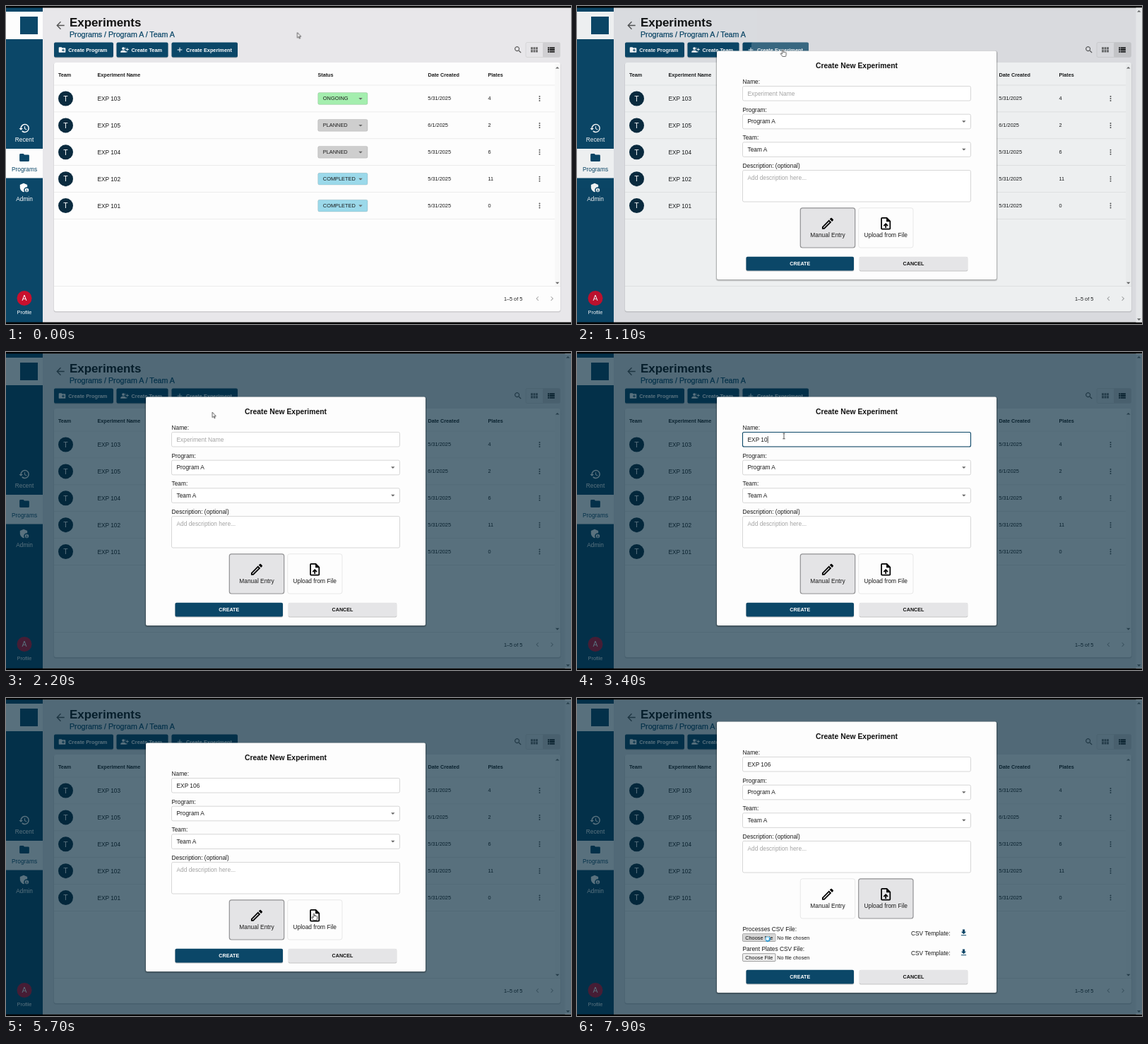
An HTML page for the animation above (8000 ms loop, 800 px wide and 450 px high).

```html
<!DOCTYPE html>
<html lang="en">
<head>
<meta charset="utf-8">
<title>Experiments</title>
<style>
html, body { margin: 0; width: 100%; height: 100%; overflow: hidden; background: #000; }
svg { display: block; width: 100vw; height: 100vh; }
text { font-family: "Liberation Sans", Arial, sans-serif; white-space: pre; }
.b { font-weight: bold; }
.m { text-anchor: middle; }
.lift { animation: lift 8s step-end infinite; }
.drop { animation: drop 8s step-end infinite; }
.dim { animation: dim 8s step-end infinite; }
.cursor { animation: travel 8s infinite; }
.spin { animation: spin 1s linear infinite; }
@keyframes lift { 0% { transform: none; } 72.5%, 100% { transform: translateY(-30px); } }
@keyframes drop { 0% { transform: none; } 72.5%, 100% { transform: translateY(30px); } }
@keyframes dim { 0% { opacity: 0; } 13.75% { opacity: .1; } 15% { opacity: .97; } 16.25%, 100% { opacity: 1; } }
@keyframes spin { to { transform: rotate(360deg); } }
@keyframes travel {
  0% { transform: translate(412.5px, 37.5px); animation-timing-function: ease-in-out; }
  11.25%, 22.5% { transform: translate(291.5px, 62px); animation-timing-function: ease-in-out; }
  33.75%, 52.5% { transform: translate(293px, 119px); animation-timing-function: ease-in-out; }
  68.75%, 80% { transform: translate(436px, 305px); animation-timing-function: cubic-bezier(.2, .5, .45, 1); }
  91.25%, 100% { transform: translate(268.5px, 336.5px); }
}
</style>
</head>
<body>
<script>
const LOOP = 8000, OPEN = 1100, FOCUS = 3000, BLUR = 5700, EXPAND = 5800;
const NAVY = '#0b4768', INK = '#1b1b1b';
const rules = [];

// Wraps content so that it shows only within the given [from, to] spans.
function during(spans, content) {
  const name = 'show' + rules.length;
  const at = (ms, state) => `${ms / LOOP * 100}% { visibility: ${state}; }`;
  const frames = [spans[0][0] > 0 ? at(0, 'hidden') : ''];
  for (const [from, to] of spans) {
    frames.push(at(from, 'visible'));
    if (to < LOOP) frames.push(at(to, 'hidden'));
  }
  frames.push(at(LOOP, spans.at(-1)[1] < LOOP ? 'hidden' : 'visible'));
  rules.push(`@keyframes ${name} { ${frames.join(' ')} } .${name} { animation: ${name} 8s step-end infinite; }`);
  return `<g class="${name}">${content}</g>`;
}

const text = (x, y, size, str, cls = '', fill = INK, extra = '') =>
  `<text x="${x}" y="${y}" font-size="${size}" class="${cls}" fill="${fill}" ${extra}>${str}</text>`;
const rect = (x, y, x2, y2, fill, extra = '') =>
  `<rect x="${x}" y="${y}" width="${x2 - x}" height="${y2 - y}" fill="${fill}" ${extra}/>`;
const path = (d, fill, extra = '') => `<path d="${d}" fill="${fill}" ${extra}/>`;
const line = (x, y, x2, color = '#e2e2e2') => rect(x, y - .3, x2, y + .3, color);
const caretDown = (x, y, fill = '#666') => path(`M${x - 2.7} ${y - 1.3}h5.4l-2.7 2.7z`, fill);
const caretUp = (x, y, fill = '#666') => path(`M${x - 2.7} ${y + 1.3}h5.4l-2.7-2.7z`, fill);

const ICONS = {
  back: 'M20 11H7.8l5.6-5.6L12 4l-8 8 8 8 1.4-1.4L7.8 13H20z',
  newFolder: 'M20 6h-8l-2-2H4a2 2 0 0 0-2 2v12a2 2 0 0 0 2 2h16a2 2 0 0 0 2-2V8a2 2 0 0 0-2-2zm-1 8h-3v3h-2v-3h-3v-2h3V9h2v3h3z',
  folder: 'M10 4H4a2 2 0 0 0-2 2v12a2 2 0 0 0 2 2h16a2 2 0 0 0 2-2V8a2 2 0 0 0-2-2h-8z',
  people: 'M8 4a4 4 0 1 0 0 8 4 4 0 1 0 0-8zM0 20v-2.500c0-2.600 5.300-4 8-4s8 1.400 8 4V20zM12.500 4.200a4 4 0 0 1 0 7.600 6 6 0 0 0 0-7.600zM17 20h2v-3l-2-2zM19 7h2v3h3v2h-3v3h-2v-3h-3v-2h3z',
  add: 'M19 13h-6v6h-2v-6H5v-2h6V5h2v6h6z',
  search: 'M15.500 14h-.8l-.3-.3A6.500 6.500 0 1 0 9.500 16c1.600 0 3.100-.6 4.200-1.600l.3.3v.8l5 5 1.500-1.500zm-6 0a4.500 4.500 0 1 1 0-9 4.500 4.500 0 0 1 0 9z',
  grid: 'M3 5h5v6H3zM9.500 5h5v6h-5zM16 5h5v6h-5zM3 12.500h5v6H3zM9.500 12.500h5v6h-5zM16 12.500h5v6h-5z',
  list: 'M3 5h4v4H3zM8 5h13v4H8zM3 10h4v4H3zM8 10h13v4H8zM3 15h4v4H3zM8 15h13v4H8z',
  history: 'M13 3a9 9 0 0 0-9 9H1l4 4 4-4H6a7 7 0 1 1 2 4.900l-1.400 1.500A9 9 0 1 0 13 3zm-1 5v5l4.300 2.500.7-1.200-3.500-2.100V8z',
  shield: 'M18 11V6.300L10.500 3 3 6.300v4.900c0 4.500 3.200 8.800 7.500 9.800l1.600-.5A6 6 0 0 1 18 11zM17 13a4 4 0 1 0 0 8 4 4 0 1 0 0-8zm0 1.400a1.100 1.100 0 1 1 0 2.200 1.100 1.100 0 1 1 0-2.200zm0 5.300c-1 0-1.700-.5-2.200-1.200.5-.8 3.900-.8 4.400 0-.5.7-1.200 1.200-2.200 1.200z',
  edit: 'M14 9l1 1-9 9H5v-1zM17.700 3a1 1 0 0 0-.7.3l-1.900 1.800 3.800 3.800L20.700 7a1 1 0 0 0 0-1.400l-2.300-2.300a1 1 0 0 0-.7-.3zM14 6.200L3 17.200V21h3.800l11-11z',
  upload: 'M14 2H6a2 2 0 0 0-2 2v16a2 2 0 0 0 2 2h12a2 2 0 0 0 2-2V8zm4 18H6V4h7v5h5zM8 15l1.400 1.400 1.600-1.600V19h2v-4.200l1.600 1.600L16 15l-4-4z',
  download: 'M19 9h-4V3H9v6H5l7 7zM5 18v2h14v-2z',
  more: 'M12 4a2 2 0 1 0 0 4 2 2 0 1 0 0-4zm0 6a2 2 0 1 0 0 4 2 2 0 1 0 0-4zm0 6a2 2 0 1 0 0 4 2 2 0 1 0 0-4z',
  prev: 'M15.400 7.400L14 6l-6 6 6 6 1.400-1.400L10.800 12z',
  next: 'M8.600 16.600L10 18l6-6-6-6-1.400 1.400 4.600 4.600z'
};
const icon = (name, cx, cy, size, fill) =>
  path(ICONS[name], fill, `fill-rule="evenodd" transform="translate(${cx - size / 2} ${cy - size / 2}) scale(${size / 24})"`);
const avatar = (x, y, letter, fill) =>
  `<circle cx="${x}" cy="${y}" r="10.5" fill="${fill}"/>` + text(x, y + 3.700, 10.400, letter, 'm', '#fff');

function sidebar() {
  const item = (name, y, label, fill) => icon(name, 26, y, 16.500, fill) + text(26, y + 19.300, 8.350, label, 'm', fill);
  return rect(0, 2.500, 52, 447.500, NAVY) + rect(0, 8, 52, 47, '#fdfdfd') + rect(20, 15, 45, 40, NAVY) +
    rect(0, 202, 52, 243.500, '#fdfdfd') +
    item('history', 173, 'Recent', '#fff') + item('folder', 214.500, 'Programs', NAVY) + item('shield', 257, 'Admin', '#fff') +
    avatar(26, 413.500, 'A', '#c8102e') + text(26, 435.500, 7.350, 'Profile', 'm', '#fff');
}

function toolbar() {
  const button = (x, x2, name, label, labelX) =>
    rect(x, 52.300, x2, 73.500, '#000', 'rx="2" opacity=".2"') + rect(x, 51.500, x2, 72.500, NAVY, 'rx="2"') +
    icon(name, x + 11.500, 62, 11.500, '#fff') + text(labelX, 64.500, 7.350, label, 'b', '#fff');
  return icon('back', 77, 27.500, 17, '#555') + text(90, 29.300, 16.900, 'Experiments', 'b', '#111') +
    text(90, 43.500, 10.650, 'Programs / Program A / Team A', '', NAVY, `stroke="${NAVY}" stroke-width=".25"`) +
    button(68, 152, 'newFolder', 'Create Program', 88.300) +
    button(156.500, 229.500, 'people', 'Create Team', 177.500) +
    button(234.500, 328, 'add', 'Create Experiment', 255) +
    during([[1000, 1300]], rect(247, 51.500, 328, 72.500, '#fff', 'rx="2" opacity=".2"')) +
    icon('search', 725, 62, 13, '#555') +
    rect(736, 51.500, 784.500, 72.500, '#e6e5e8', 'rx="2" stroke="#cbcbcd" stroke-width=".6"') +
    rect(760, 51.800, 784.300, 72.200, '#d0cfd2', 'rx="1.5"') +
    icon('grid', 748, 62, 13, '#666') + icon('list', 772, 62, 13, '#222');
}

function table() {
  const statuses = { ONGOING: '#a4eeae', PLANNED: '#cecece', COMPLETED: '#9bd9ea' };
  const rows = [
    ['EXP 103', 'ONGOING', '5/31/2025', 4],
    ['EXP 105', 'PLANNED', '6/1/2025', 2],
    ['EXP 104', 'PLANNED', '5/31/2025', 6],
    ['EXP 102', 'COMPLETED', '5/31/2025', 11],
    ['EXP 101', 'COMPLETED', '5/31/2025', 0]
  ];
  const heads = [[74, 'Team'], [129.500, 'Experiment Name'], [441.500, 'Status'], [597.500, 'Date Created'], [682.500, 'Plates']];
  const row = ([name, status, date, plates], i) => {
    const y = 131 + i * 37.900;
    return avatar(84.500, y, 'T', '#0a2b3f') + text(129.500, y + 3, 8.300, name) +
      rect(441.700, y - 8.400, 512, y + 8.400, statuses[status], 'rx="2" stroke="#000" stroke-opacity=".18" stroke-width=".6"') +
      text(448.800, y + 2.400, 7.400, status) + caretDown(502, y + .3) +
      text(597.300, y + 2.400, 7.350, date) + text(682.500, y + 2.400, 7.350, plates) +
      icon('more', 755.500, y, 12, '#555') + line(68, y + 18.900, 777);
  };
  return rect(67.500, 80.500, 785.500, 433.500, '#000', 'rx="3" opacity=".12"') +
    rect(68, 80, 785, 432, '#fdfdfd', 'rx="3"') + rect(777, 82, 785, 396, '#f8f8f8') +
    caretUp(780.700, 87.300) + caretDown(780.700, 392) +
    heads.map(([x, label]) => text(x, 100.200, 7.200, label, 'b')).join('') + line(68, 112, 777) +
    rows.map(row).join('') + line(68, 396.500, 785) +
    text(705, 416.700, 7.250, '1–5 of 5') + icon('prev', 752.500, 414, 12.500, '#aaa') + icon('next', 773, 414, 12.500, '#aaa');
}

function nameField() {
  const x = 241.500, y = 126.700, end = 5700;
  const typed = [[3100, 'EX', 11.100], [3200, 'EXP', 16.700], [3300, 'EXP 1', 23.700], [3400, 'EXP 10', 28.300], [3700, 'EXP 106', 33]];
  const caret = dx => rect(x + dx, 119, x + dx + .7, 129, '#111');
  const steps = typed.map(([from, str, width], i) => {
    const last = i === typed.length - 1;
    const to = last ? LOOP : typed[i + 1][0];
    const lit = last ? [[from, 3900], [4400, 4900], [5400, end]] : [[from, to]];
    return during([[from, to]], text(x, y, 8.350, str)) + during(lit, caret(width));
  });
  return during([[FOCUS, BLUR]], rect(234.500, 113.500, 557.500, 134, 'none', `rx="2" stroke="${NAVY}" stroke-width="1.1"`)) +
    during([[OPEN, 3100]], text(x, y, 8.350, 'Experiment Name', '', '#a3a3a3')) +
    during([[FOCUS, 3100]], caret(0)) + steps.join('');
}

function dialog() {
  const sheet = (top, bottom) =>
    rect(196.500, top - .5, 595.500, bottom + 2.500, '#000', 'rx="4" opacity=".13"') +
    rect(197.300, top, 594.700, bottom + 1.200, '#000', 'rx="3" opacity=".2"') + rect(198, top, 594, bottom, '#fdfdfd', 'rx="2"');
  const field = (label, top, bottom, value = '', fill = INK) =>
    text(234.500, top - 3.500, 8.350, label) +
    rect(234.500, top, 557.500, bottom, '#fff', 'rx="2" stroke="#c6c6c6" stroke-width=".7"') +
    text(241.500, top + 13.200, 8.350, value, '', fill);
  const card = (x, x2, active) => rect(x, 285.800, x2, 342, active ? '#e4e4e6' : '#fdfdfd',
    `rx="3" stroke="${active ? '#929294' : '#dedede'}" stroke-width="${active ? 1.200 : .7}"`);
  const cards = manual => card(316.300, 393.700, manual) + card(398.700, 476, !manual);
  const action = (x, x2, label, fill, ink) =>
    rect(x - .3, 355, x2 + .3, 375.600, '#000', 'rx="2" opacity=".22"') + rect(x, 354.700, x2, 374.500, fill, 'rx="2"') +
    text((x + x2) / 2, 367.200, 7.150, label, 'b m', ink);
  const chooser = (y, label, hovered = '') =>
    text(234.500, y, 8.350, label) +
    rect(234.600, y + 3.700, 281, y + 14.500, '#efefef', 'rx="1" stroke="#767676" stroke-width=".7"') + hovered +
    text(257.800, y + 11.500, 7.350, 'Choose File', 'm', '#111') + text(283.200, y + 11.500, 7.300, 'No file chosen') +
    text(473, y + 5.500, 8.350, 'CSV Template:') + icon('download', 547.500, y + 2.200, 12.500, NAVY);
  const hover = during([[7300, LOOP]], rect(235, 334, 280.600, 344.200, '#d6d6d6'));

  return during([[OPEN, EXPAND]], sheet(63.500, 387)) + during([[EXPAND, LOOP]], sheet(33.500, 417)) +
    during([[OPEN, LOOP]],
      `<g class="lift">` + text(396, 88.300, 10.400, 'Create New Experiment', 'b m', '#111') +
      field('Name:', 113.500, 134) +
      field('Program:', 153.200, 173.800, 'Program A') + caretDown(547.800, 163.500) +
      field('Team:', 192.800, 213.400, 'Team A') + caretDown(547.800, 203) +
      field('Description: (optional)', 232.500, 277, 'Add description here...', '#a3a3a3') + '</g>') +
    `<g class="lift">` + nameField() +
    during([[OPEN, EXPAND]], cards(true)) + during([[EXPAND, LOOP]], cards(false)) +
    during([[OPEN, LOOP]], icon('edit', 355, 307.800, 21.500, '#000') + text(355, 327, 8.400, 'Manual Entry', 'm') +
      icon('upload', 437.200, 307.800, 21, '#000') + text(437.200, 327, 8.400, 'Upload from File', 'm')) + '</g>' +
    during([[EXPAND, LOOP]], chooser(330, 'Processes CSV File:', hover) + chooser(358, 'Parent Plates CSV File:')) +
    during([[OPEN, LOOP]], `<g class="drop">` + action(239.500, 392, 'CREATE', NAVY, '#fff') +
      action(400, 553, 'CANCEL', '#e5e5e7', '#111') + '</g>');
}

function cursor() {
  const outline = 'stroke="#222" stroke-width=".7" stroke-linejoin="round"';
  const arrow = path('M0 0v7.500l1.800-1.600 1.200 2.700 1.100-.5-1.200-2.600h2.300z', '#fff', outline);
  const hand = path('M-.9 1v4.800l-1.100-.8c-.8-.5-1.500.3-1 1l2.600 3.600h4.200l.9-2.800v-2.500c0-.9-1-.9-1.300-.4-.2-.7-1.100-.7-1.400-.2-.2-.5-.9-.5-1.200-.1v-2.600c0-1.200-1.700-1.200-1.700 0z', '#fff', outline);
  const beam = path('M-1.700-3.800h3.400M0-3.800v7.600M-1.700 3.800h3.400', 'none', 'stroke="#333" stroke-width=".8"');
  const busy = '<g transform="translate(1.5 4.500)"><circle r="3" fill="#e8f4fa" stroke="#8fd0ee" stroke-width="1.600"/>' +
    '<circle class="spin" r="3" fill="none" stroke="#1d8fcb" stroke-width="1.600" stroke-dasharray="9 10"/></g>';
  return `<g class="cursor">` +
    during([[0, 700], [2000, 2600], [4400, 5200], [7000, 7200]], arrow) +
    during([[700, 2000], [5200, 7000], [7200, 7600]], hand) +
    during([[2600, 4400]], beam) + during([[7600, LOOP]], busy) + '</g>';
}

const scrollbar = during([[OPEN, LOOP]], rect(791.500, 2.500, 800, 447.500, '#f4f4f5') + caretUp(795.700, 7.300) + caretDown(795.700, 443.500));
const backdrop = `<g class="dim">${rect(0, 2.500, 800, 447.500, '#00263a', 'opacity=".65"')}</g>`;
const scene = rect(0, 0, 800, 450, '#000') + rect(52, 2.500, 800, 447.500, '#e8e7ea') +
  sidebar() + toolbar() + table() + scrollbar + backdrop + dialog() + cursor();

document.body.innerHTML = `<svg viewBox="0 0 800 450"><style>${rules.join('\n')}</style>${scene}</svg>`;
</script>
</body>
</html>
```
